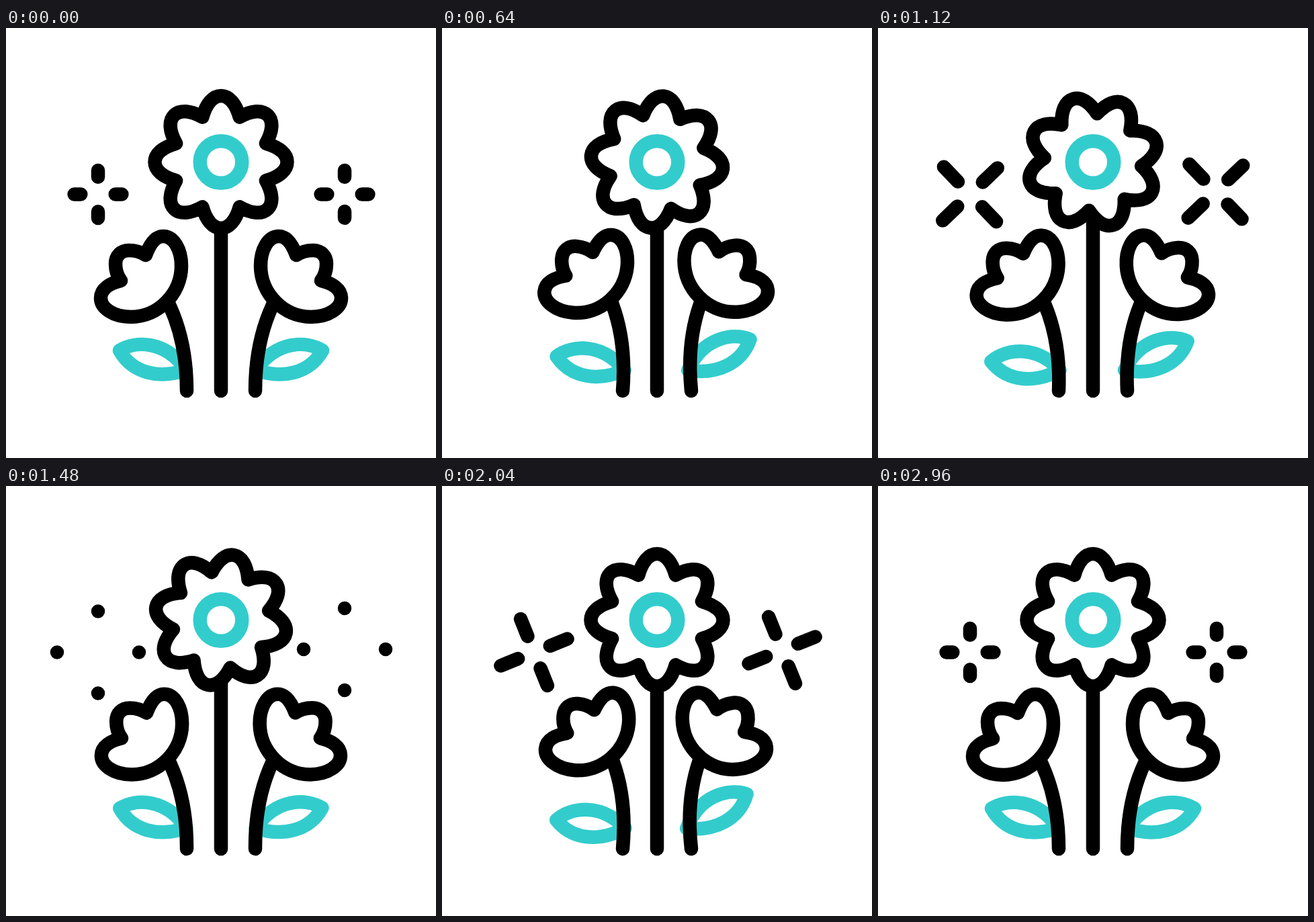
These frames come from a looping animation (640x640 px, 3 s). An HTML page:

```html
<!DOCTYPE html>
<html lang="en">
<head>
<meta charset="utf-8">
<title>Flowers</title>
<style>
  html, body { margin: 0; width: 100%; height: 100%; overflow: hidden; background: #fff; }
  svg { display: block; width: 100vw; height: 100vh; }
  .ink, .teal { fill: none; stroke: #000; stroke-width: 20.5; stroke-linecap: round; stroke-linejoin: round; }
  .teal { stroke: #33cccc; }
  .solid { fill: #fff; }
</style>
</head>
<body>
<svg viewBox="0 0 640 640">
  <defs>
    <path id="leaf" class="teal" d="M169 480C193 465 238 465 268 509C228 523 188 514 169 480Z"/>
    <g id="bud">
      <path class="ink" d="M243 412C258 444 269 488 269 540"/>
      <path class="ink solid" d="M208 338C214 322 222 310 234 310C250 310 261 330 261 354
        C261 395 227 430 186 430C160 430 141 417 141 402C141 388 155 380 171 376
        C165 368 163 359 163 351C163 339 171 331 183 331C192 331 200 333 208 338Z"/>
    </g>
  </defs>

  <g id="stalkL">
    <g id="leafL"><use href="#leaf"/></g>
    <use href="#bud"/>
  </g>
  <g id="stalkR">
    <g id="leafR"><use href="#leaf" transform="matrix(-1 0 0 1 640 0)"/></g>
    <use href="#bud" transform="matrix(-1 0 0 1 640 0)"/>
  </g>

  <path class="ink" d="M320 285V540"/>
  <path id="petals" class="ink solid"/>
  <circle class="teal" cx="320" cy="199.5" r="31.3"/>

  <path id="sparkL" class="ink"/>
  <path id="sparkR" class="ink"/>
</svg>
<script>
  const LOOP = 3000, STEP = 40, TURN = 2960;
  const $ = id => document.getElementById(id);
  const clamp = v => Math.min(1, Math.max(0, v));
  const ease = v => { v = clamp(v); return v * v * (3 - 2 * v); };

  // Eased value through [time, value] keys
  function track(keys, t) {
    for (let i = 1; i < keys.length; i++) {
      const [t0, a] = keys[i - 1], [t1, b] = keys[i];
      if (t < t1) return a + (b - a) * ease((t - t0) / (t1 - t0));
    }
    return keys[keys.length - 1][1];
  }

  const SPIN = [[0, 0], [838, -360], [1350, 0], [2040, -360], [2554, 0]];
  const SWAY = [[0, 0], [823, 1], [1375, 0], [2040, 1], [2575, 0]];
  const FLAP = [[0, 0], [140, 0], [994, 1], [1400, 0], [1440, 0], [2080, 1], [2730, 0]];
  const BURSTS = [-138, 810, 1760, 2822];

  function petalPath() {
    const half = [[-27.7, -66.9], [-22, -87], [-12, -98.5], [0, -98.5]];
    const other = half.slice(0, 3).reverse().map(([x, y]) => [-x, y]);
    const at = (a, [x, y]) => {
      const c = Math.cos(a), s = Math.sin(a);
      return `${(x * c - y * s).toFixed(2)} ${(x * s + y * c).toFixed(2)} `;
    };
    let d = 'M' + at(0, half[0]);
    for (let i = 0; i < 8; i++) {
      const put = p => at(i * Math.PI / 4, p);
      d += 'C' + half.slice(1).map(put).join('') + 'C' + other.map(put).join('');
    }
    return d + 'Z';
  }

  function sparkPath(t, cy) {
    const start = BURSTS.find(s => t >= s && t < s + 750);
    if (start === undefined) return '';
    const age = t - start;
    const outer = 25.7 + 35.3 * ease(age / 400);
    const inner = Math.min(25.7 + 35.3 * ease((age - 290) / 360), outer - 0.01);
    return [[0, -1], [1, 0], [0, 1], [-1, 0]].map(([x, y]) =>
      `M${x * inner} ${y * inner + cy}L${x * outer} ${y * outer + cy}`).join('');
  }

  const place = (id, value) => $(id).setAttribute('transform', value);

  function draw(t) {
    const sway = track(SWAY, t), flap = track(FLAP, t);
    place('stalkL', `rotate(${5.2 * sway} 269 540)`);
    place('stalkR', `rotate(${-6.4 * sway} 371 540)`);
    place('leafL', `rotate(${-15 * flap} 269 502)`);
    place('leafR', `rotate(${-7.2 * flap} 371 545)`);
    place('petals', `translate(320 199.5) rotate(${track(SPIN, t)})`);

    const turn = 360 * t / TURN;
    place('sparkL', `translate(137 247.5) rotate(${turn})`);
    place('sparkR', `translate(504 245.2) rotate(${turn})`);
    $('sparkL').setAttribute('d', sparkPath(t, 0));
    $('sparkR').setAttribute('d', sparkPath(t, 2.2));
  }

  $('petals').setAttribute('d', petalPath());
  const begin = performance.now();
  function tick() {
    const t = (performance.now() - begin) % LOOP;
    draw(Math.floor(t / STEP) * STEP);
    requestAnimationFrame(tick);
  }
  tick();
</script>
</body>
</html>
```
